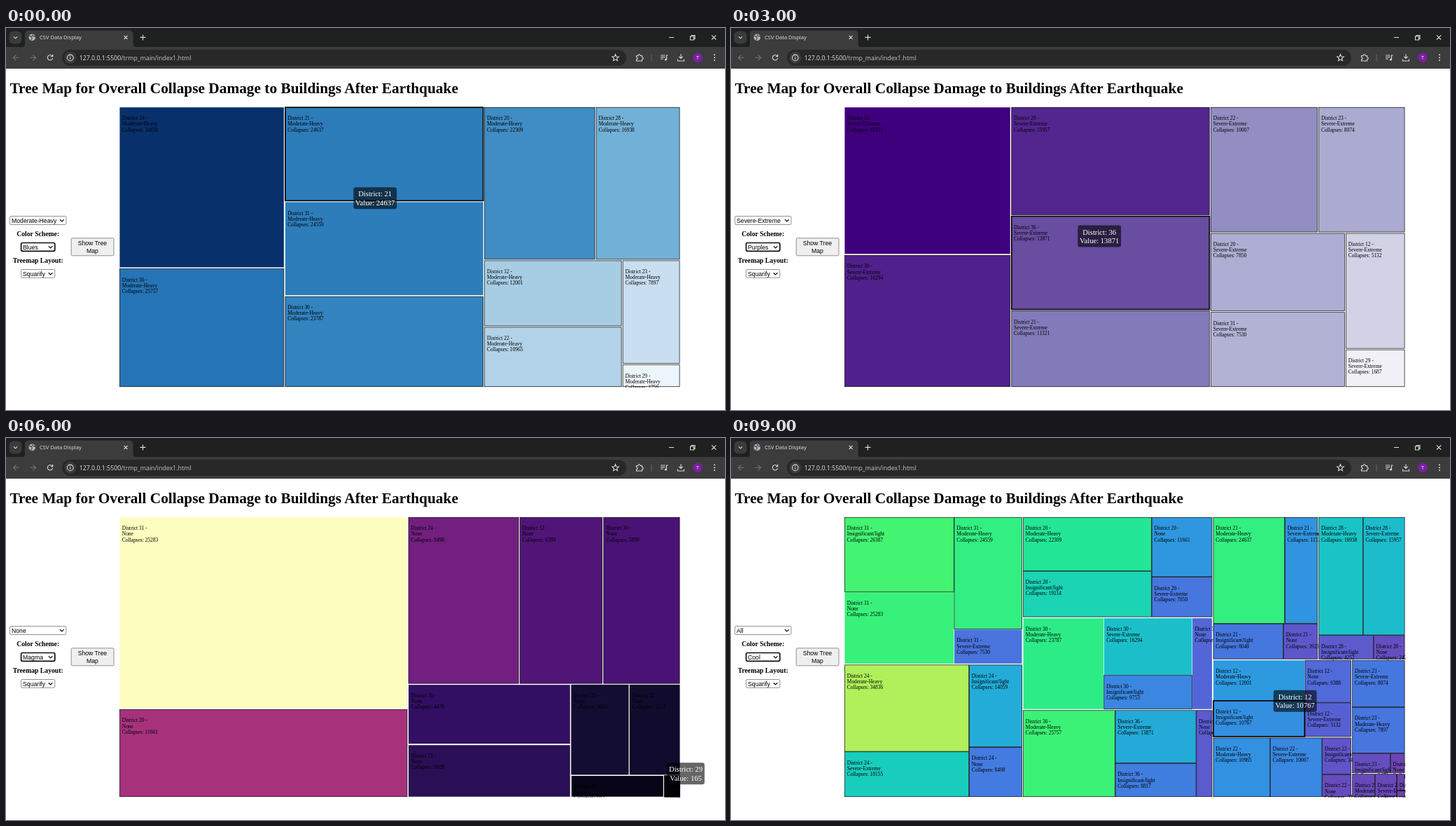
Write an HTML page that moves like this. It is 1027 by 545 pixels and loops after 10000 ms.

```html
<!DOCTYPE html>
<html lang="en">
<head>
<meta charset="utf-8">
<title>CSV Data Display</title>
<style>
  html, body { margin: 0; width: 100%; height: 100%; overflow: hidden; background: #fff; }
  #stage { display: block; width: 100vw; height: 100vh; }
  text { white-space: pre; }
  .serif { font-family: "Liberation Serif", "Times New Roman", serif; }
  .sans { font-family: "Liberation Sans", Arial, sans-serif; font-size: 8.7px; }
  .ui { font-family: "Open Sans", "Noto Sans", sans-serif; }
  .bold { font-weight: bold; }
  .mid { text-anchor: middle; }
  .icon { fill: none; stroke: #dcdcdc; stroke-width: 1.1; }
  .dim { stroke: #747474; }
  .box { fill: #fff; stroke: #767676; stroke-width: .8; }
  .caret { fill: none; stroke: #111; stroke-width: 1.2; }
  .cell { stroke: #000; stroke-width: 1; }
  .cell.seen { stroke: none; }
  .cell.hot { stroke-width: 2.5; }
</style>
</head>
<body>
<svg id="stage" viewBox="0 0 1027 545" preserveAspectRatio="none">
  <rect width="1027" height="545" fill="#fff"/>

  <!-- browser window -->
  <rect width="1027" height="30" fill="#1f2020"/>
  <path d="M22 27.5q5 0 5-5V9q0-5.500 5.500-5.500H176q5.500 0 5.500 5.500v13.500q0 5 5 5z" fill="#3c3c3c"/>
  <rect y="27" width="1027" height="31" fill="#3c3c3c"/>
  <rect x="4.500" y="4.500" width="18" height="18" rx="6" fill="#3a3b3b"/>
  <path class="icon" d="M11 12.300l2.500 2.500 2.500-2.500"/>
  <circle cx="37.300" cy="13.400" r="4.800" fill="#b4b7ba"/>
  <path d="M33.500 11.500q3 0 3.500 2t-1.500 4M38 9q-1 2.500 1.500 2.500T41.500 13" fill="none" stroke="#4a4c4e" stroke-width="1.300"/>
  <text class="ui" x="48" y="16.200" font-size="7.600" fill="#e3e3e3">CSV Data Display</text>
  <path class="icon" d="M168.700 11l4.800 4.800m0-4.800l-4.800 4.800M191.500 13.400h8m-4-4v8"/>
  <path class="icon" d="M947 13.500h7M977.500 12h5v5h-5zM979 12v-1.500h5v5h-1.500M1008 10.300l6.200 6.200m0-6.200l-6.200 6.200" stroke-width="1"/>

  <path class="icon dim" d="M18.500 42.300h-8m4-4l-4 4 4 4M34.500 42.300h8m-4-4l4 4-4 4"/>
  <path class="icon" d="M66 40a3.700 3.700 0 1 0 .7 3M66.700 37.800v2.900h-2.900"/>
  <rect x="80" y="31" width="806" height="23" rx="11.500" fill="#282828"/>
  <circle cx="91.800" cy="42.400" r="8.300" fill="#3c3c3c"/>
  <circle class="icon" cx="91.800" cy="42.400" r="4.300"/>
  <path class="icon" d="M91.800 41.800v2.900M91.800 39.700v1.100"/>
  <text class="ui" x="104.700" y="45.700" font-size="8.800" fill="#c4c7c5"><tspan fill="#e3e3e3">127.0.0.1:5500</tspan>/trmp_main/index1.html</text>
  <path id="star" class="icon"/>
  <path class="icon" d="M900.500 39.500h2.500q0-2 1.500-2t1.500 2h2.500v2.300q1.800 0 1.800 1.500t-1.800 1.500v2.200h-8v-2.300q1.700 0 1.700-1.500t-1.700-1.500z"/>
  <path d="M922 37.500v10" stroke="#666" stroke-width="1"/>
  <path class="icon" d="M935 39h6.500M935 41.500h6.500M935 44h4M943.500 45v-6h2"/>
  <circle cx="942.300" cy="45" r="1.600" fill="#dcdcdc"/>
  <path class="icon" d="M964 37.300v6m-2.700-2.600l2.700 2.700 2.700-2.700M959.500 44.500v2.500h9v-2.500"/>
  <circle cx="988" cy="42.200" r="6.700" fill="#7b1fa2"/>
  <text class="ui mid" x="988" y="44.800" font-size="7" fill="#fff">T</text>
  <g fill="#dcdcdc"><circle cx="1012" cy="38.300" r="1"/><circle cx="1012" cy="42.200" r="1"/><circle cx="1012" cy="46.100" r="1"/></g>

  <!-- page -->
  <text class="serif bold" x="5.400" y="92.600" font-size="21.350">Tree Map for Overall Collapse Damage to Buildings After Earthquake</text>
  <g class="serif bold mid" font-size="9.700">
    <text x="45.700" y="296.500">Color Scheme:</text>
    <text x="45.700" y="334.500">Treemap Layout:</text>
  </g>
  <rect class="box" x="5.600" y="268.500" width="80.300" height="12" rx="1.500"/>
  <rect class="box" x="21.600" y="306.500" width="48.200" height="11.800" rx="2" style="stroke:#101010;stroke-width:1.700"/>
  <rect class="box" x="21.600" y="344.500" width="48.200" height="11.800" rx="1.500"/>
  <path class="caret" d="M77 273.200l2.800 2.700 2.800-2.700M60.800 311.200l2.800 2.700 2.800-2.700M60.800 349.200l2.800 2.700 2.800-2.700"/>
  <text class="sans" x="24" y="353.500">Squarify</text>
  <rect class="box" x="93.200" y="299.800" width="60.800" height="25" rx="1.500" style="fill:#efefef"/>
  <g class="sans mid"><text x="123.400" y="310.200">Show Tree</text><text x="123.400" y="320.900">Map</text></g>
  <g id="scenes"></g>
</svg>
<script>
const NS = 'http://www.w3.org/2000/svg';
const W = 1200, H = 600, PAD = 1, SCALE = 0.6686;
const PHI = (1 + Math.sqrt(5)) / 2;
const STEP = 1000;

const LEVELS = { S: 'Severe-Extreme', M: 'Moderate-Heavy', I: 'Insignificant/light', N: 'None' };

// district, then its collapses at levels S, M, I, N
const DATA = [
  [31, 7530, 24559, 26387, 25283], [24, 18155, 34836, 14059, 8498],
  [20, 7850, 22309, 19114, 11661], [30, 16294, 23787, 9753, 5899],
  [36, 13871, 25757, 8817, 4476], [21, 11321, 24637, 8048, 3929],
  [28, 15957, 16938, 4252, 2420], [12, 5132, 12001, 10767, 6388],
  [22, 10007, 10965, 3476, 2121], [23, 8074, 7897, 2472, 942],
  [29, 1687, 1756, 450, 165]
];

const SCENES = [
  { level: 'M', scheme: 'Blues', hot: '21M', tip: [496.3, 227.2], seen: '24M 31M' },
  { level: 'M', scheme: 'Greens', hot: '21M', tip: [496.3, 227.2], seen: '24M 31M' },
  { level: 'S', scheme: 'Oranges', hot: '36S', tip: [495.3, 281.5], seen: '24S' },
  { level: 'S', scheme: 'Purples', hot: '36S', tip: [495.3, 281.5], seen: '24S' },
  { level: 'I', scheme: 'Reds', hot: '12I', tip: [516.8, 348.5], seen: '31I 20I' },
  { level: 'I', scheme: 'Viridis', hot: '30I', tip: [623.8, 387.6], seen: '31I 20I 12I' },
  { level: 'N', scheme: 'Magma', hot: '29N', tip: [944.2, 463.2], seen: '31N 36N 21N 23N' },
  { level: 'N', scheme: 'Plasma', hot: '36N', tip: [598.8, 369.2], seen: '31N' },
  { level: 'SMIN', scheme: 'Warm', hot: '12I', tip: [774.8, 359.8], seen: '31S 31N 30M 30S 30N 12M' },
  { level: 'SMIN', scheme: 'Cool', hot: '12I', tip: [774.8, 359.8], seen: '31S 31N 30M 30S 30N 12M' }
];

/* colour scales */
const stops = list => list.split(' ').map(h => [0, 2, 4].map(i => parseInt(h.substr(i, 2), 16)));
const rgb = c => `rgb(${c.map(v => Math.round(Math.min(255, Math.max(0, v)))).join()})`;

function spline(list) {
  const p = stops(list), n = p.length - 1;
  return t => {
    const i = Math.min(n - 1, Math.floor(t * n)), u = t * n - i;
    return rgb([0, 1, 2].map(k => {
      const b = p[i][k], c = p[i + 1][k];
      const a = i > 0 ? p[i - 1][k] : 2 * b - c;
      const d = i < n - 1 ? p[i + 2][k] : 2 * c - b;
      return ((1 - u) ** 3 * a + (4 - 6 * u * u + 3 * u ** 3) * b +
        (1 + 3 * u + 3 * u * u - 3 * u ** 3) * c + u ** 3 * d) / 6;
    }));
  };
}

function ramp(list) {
  const p = stops(list), n = p.length - 1;
  return t => {
    const i = Math.min(n - 1, Math.floor(t * n)), u = t * n - i;
    return rgb(p[i].map((v, k) => v + (p[i + 1][k] - v) * u));
  };
}

function helix(hue) {
  return t => {
    const h = (hue + (80 - hue) * t + 120) * Math.PI / 180;
    const s = 0.75 + 0.75 * t, l = 0.35 + 0.45 * t, a = s * l * (1 - l);
    const x = Math.cos(h), y = Math.sin(h);
    return rgb([l + a * (-0.14861 * x + 1.78277 * y),
      l + a * (-0.29227 * x - 0.90649 * y), l + a * 1.97294 * x].map(v => v * 255));
  };
}

const SCHEMES = {
  Blues: spline('f7fbff deebf7 c6dbef 9ecae1 6baed6 4292c6 2171b5 08519c 08306b'),
  Greens: spline('f7fcf5 e5f5e0 c7e9c0 a1d99b 74c476 41ab5d 238b45 006d2c 00441b'),
  Oranges: spline('fff5eb fee6ce fdd0a2 fdae6b fd8d3c f16913 d94801 a63603 7f2704'),
  Purples: spline('fcfbfd efedf5 dadaeb bcbddc 9e9ac8 807dba 6a51a3 54278f 3f007d'),
  Reds: spline('fff5f0 fee0d2 fcbba1 fc9272 fb6a4a ef3b2c cb181d a50f15 67000d'),
  Viridis: ramp('440154 482475 414487 355f8d 2a788e 21918c 22a884 44bf70 7ad151 bddf26 fde725'),
  Magma: ramp('000004 140e36 3b0f70 641a80 8c2981 b73779 de4968 f7705c fe9f6d fecf92 fcfdbf'),
  Plasma: ramp('0d0887 41049d 6a00a8 8f0da4 b12a90 cc4778 e16462 f2844b fca636 fcce25 f0f921'),
  Warm: helix(-100),
  Cool: helix(260)
};

/* squarified treemap */
const sum = list => list.reduce((s, n) => s + n.value, 0);

function place(row, x0, y0, x1, y1, across) {
  const total = sum(row);
  let at = across ? x0 : y0;
  for (const n of row) {
    const end = at + (across ? x1 - x0 : y1 - y0) * n.value / total;
    const b = across ? [at, y0, end, y1] : [x0, at, x1, end];
    n.box = [b[0] + PAD / 2, b[1] + PAD / 2, b[2] - PAD / 2, b[3] - PAD / 2];
    at = end;
  }
}

function squarify(nodes, box) {
  let [x0, y0, x1, y1] = [box[0] + PAD / 2, box[1] + PAD / 2, box[2] - PAD / 2, box[3] - PAD / 2];
  let left = sum(nodes), i = 0;
  while (i < nodes.length) {
    const dx = x1 - x0, dy = y1 - y0;
    const alpha = Math.max(dy / dx, dx / dy) / (left * PHI);
    const worst = row => {
      const v = row.map(n => n.value), beta = sum(row) ** 2 * alpha;
      return Math.max(Math.max(...v) / beta, beta / Math.min(...v));
    };
    let j = i + 1;
    while (j < nodes.length && worst(nodes.slice(i, j + 1)) <= worst(nodes.slice(i, j))) j++;
    const row = nodes.slice(i, j), part = sum(row) / left;
    if (dx < dy) {
      place(row, x0, y0, x1, y0 + dy * part, true);
      y0 += dy * part;
    } else {
      place(row, x0, y0, x0 + dx * part, y1, false);
      x0 += dx * part;
    }
    left -= sum(row);
    i = j;
  }
}

function leaves(levels) {
  const bySize = (a, b) => b.value - a.value;
  const groups = DATA.map(([id, ...values]) => {
    const kids = [...levels].map(k => ({ id, level: k, value: values['SMIN'.indexOf(k)] })).sort(bySize);
    return { kids, value: sum(kids) };
  }).sort(bySize);
  squarify(groups, [0, 0, W, H]);
  groups.forEach(g => squarify(g.kids, g.box));
  return groups.flatMap(g => g.kids);
}

/* drawing */
function add(parent, tag, attrs, text) {
  const el = document.createElementNS(NS, tag);
  for (const k in attrs) el.setAttribute(k, attrs[k]);
  if (text !== undefined) el.textContent = text;
  return parent.appendChild(el);
}

function drawTip(g, [x, y], node) {
  const back = add(g, 'rect', { x, y, height: 31, rx: 3.3, fill: '#000', 'fill-opacity': 0.6 });
  const lines = [`District: ${node.id}`, `Value: ${node.value}`].map((s, i) =>
    add(g, 'text', { class: 'serif mid', y: y + 13.2 + 12.2 * i, 'font-size': 10.6, fill: '#fff' }, s));
  const width = Math.max(...lines.map(t => t.getComputedTextLength())) + 5.6;
  back.setAttribute('width', width);
  lines.forEach(t => t.setAttribute('x', x + width / 2));
}

function drawScene({ level, scheme, hot, tip, seen }) {
  const g = add(document.getElementById('scenes'), 'g', { visibility: 'hidden' });
  add(g, 'text', { class: 'sans', x: 8, y: 277.600 }, level.length > 1 ? 'All' : LEVELS[level]);
  add(g, 'text', { class: 'sans', x: 24, y: 315.600 }, scheme);
  const map = add(g, 'svg', {
    x: 161.1, y: 111.9, width: W * SCALE, height: H * SCALE, viewBox: `0 0 ${W} ${H}`
  });
  const nodes = leaves(level), max = Math.max(...nodes.map(n => n.value));
  const visited = seen.split(' ');
  for (const n of nodes) {
    const [x0, y0, x1, y1] = n.box, key = n.id + n.level;
    const state = key === hot ? ' hot' : visited.includes(key) ? ' seen' : '';
    add(map, 'rect', {
      class: 'cell' + state, x: x0, y: y0, width: Math.max(0, x1 - x0), height: Math.max(0, y1 - y0),
      fill: SCHEMES[scheme](n.value / max)
    });
    [`District ${n.id} -`, LEVELS[n.level], `Collapses: ${n.value}`].forEach((s, i) =>
      add(map, 'text', { class: 'serif', x: x0 + 5, y: y0 + 27.1 + 12.1 * i, 'font-size': 11.15 }, s));
  }
  drawTip(g, tip, nodes.find(n => n.id + n.level === hot));
  return g;
}

const star = Array.from({ length: 10 }, (_, i) => {
  const r = i % 2 ? 2.2 : 5, a = i * Math.PI / 5;
  return `${870.5 + r * Math.sin(a)} ${42.600 - r * Math.cos(a)}`;
});
document.getElementById('star').setAttribute('d', `M${star.join('L')}z`);

const views = SCENES.map(drawScene);
const start = performance.now();
let shown = -1;

function tick() {
  const now = Math.floor((performance.now() - start) / STEP) % views.length;
  if (now !== shown) {
    views.forEach((v, i) => v.setAttribute('visibility', i === now ? 'visible' : 'hidden'));
    shown = now;
  }
  requestAnimationFrame(tick);
}
tick();
</script>
</body>
</html>
```
